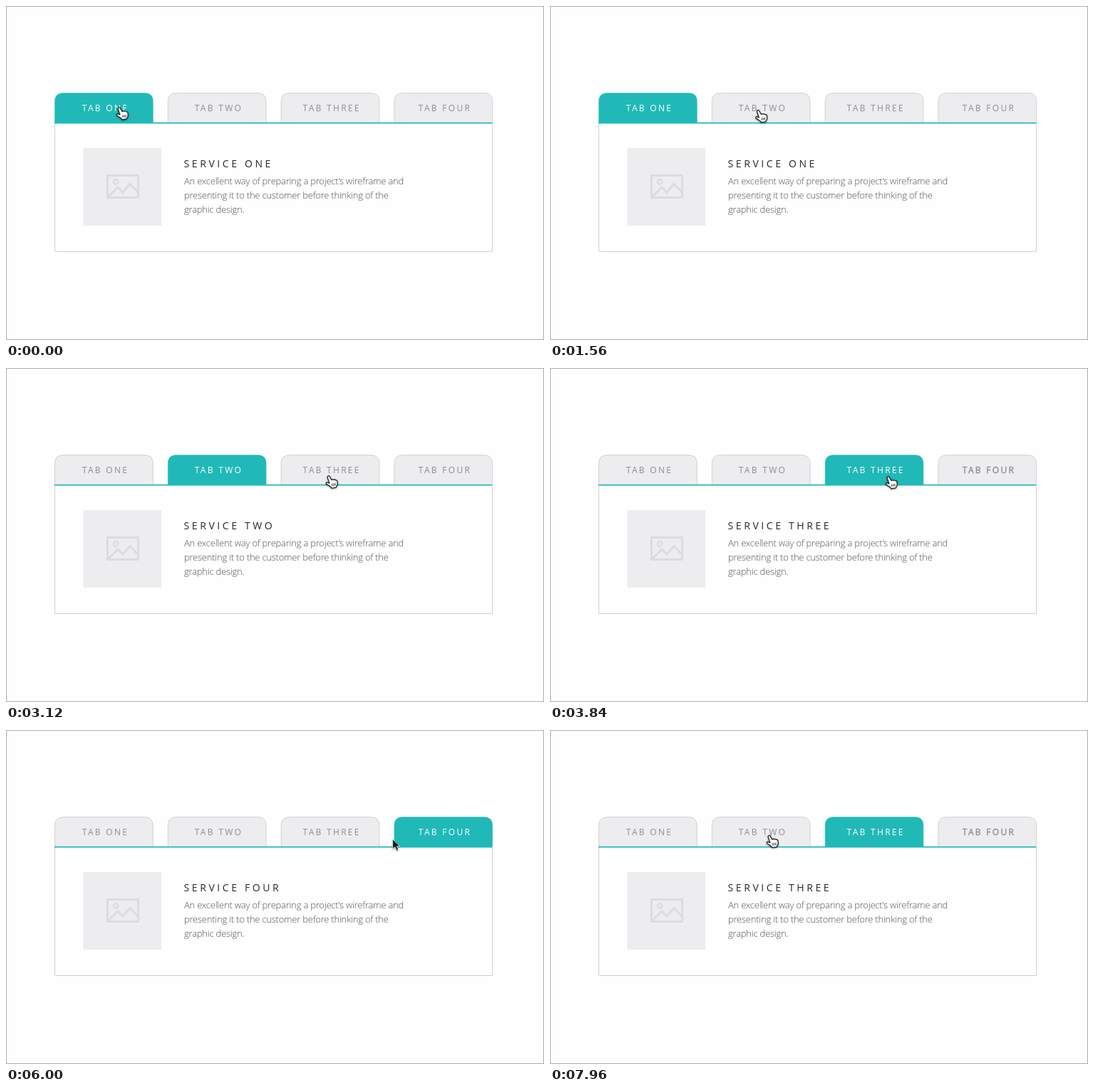
Recreate the animation shown at these times as an HTML page. Size 755x470 px, loop 8 s.

```html
<!DOCTYPE html>
<html lang="en">
<head>
<meta charset="utf-8">
<title>Tabs</title>
<style>
  html, body { margin: 0; width: 100%; height: 100%; overflow: hidden; background: #fefefe; }
  svg { display: block; width: 755px; height: 470px; font-family: "Open Sans", sans-serif; }
  .tab path { fill: #ededef; stroke: #d2d2d6; }
  .tab text { font-size: 12px; letter-spacing: 2.3px; fill: #8d8d8f; text-anchor: middle; }
  .tab.active path { fill: #20b9b7; stroke: #20b9b7; stroke-width: .5; }
  .tab.active text { fill: #fff; }
  .tab:nth-child(3).active + .tab text { stroke: #8d8d8f; stroke-width: .35px; }
  #title { font-size: 14px; letter-spacing: 3.6px; fill: #262628; }
  .copy { font-size: 13px; font-weight: 300; letter-spacing: -.23px; fill: #525254; }
  .icon { fill: none; stroke: #dcdce0; stroke-width: 3; }
  #pointer { filter: drop-shadow(0 1px 1px rgba(0, 0, 0, .4)); }
</style>
</head>
<body>
<svg viewBox="0 0 755 470">
  <rect x=".5" y=".5" width="754" height="469" fill="#fefefe" stroke="#acacac"/>
  <path d="M68.5 164V345.5H682.5V164" fill="none" stroke="#cfcfd1"/>
  <g id="tabs"></g>
  <path d="M68 164.6H682" stroke="#20b9b7" stroke-width="1.8"/>

  <rect x="108.5" y="200" width="109.5" height="109" fill="#ededef"/>
  <g class="icon">
    <rect x="142.5" y="238.5" width="43" height="31"/>
    <circle cx="154" cy="247.5" r="3.2" stroke-width="2.4"/>
    <path d="M144 268L157 255L164 262L174 250.5L186 263"/>
  </g>

  <text id="title" x="249.5" y="227"></text>
  <g class="copy">
    <text x="250" y="251">An excellent way of preparing a project’s wireframe and</text>
    <text x="250" y="271">presenting it to the customer before thinking of the</text>
    <text x="250" y="290.5">graphic design.</text>
  </g>

  <g id="pointer" stroke-linejoin="round">
    <g id="hand">
      <path d="M-2 1.5Q-1.5-.8 .8 0L4 5.5Q5.5 4 7 5.3Q8.5 4.2 9.6 5.8Q11.4 5.2 12 7.5L12.2 12L10 16L4 17L2.6 15L-3.2 11.2Q-4.4 9-2.6 8.6L.9 10Z"
        fill="#fff" stroke="#222" stroke-width="1.3"/>
      <path d="M4.8 10.5V14M6.9 10.3V13.8M9 10V13.5" stroke="#333"/>
    </g>
    <path id="arrow" d="M0 0V14L3.3 11L5.6 16.2L8.2 15.1L6 10.1H10.3Z"
      fill="#1c1c1c" stroke="#fff" stroke-width=".8"/>
  </g>
</svg>
<script>
const DURATION = 8000;
const NAMES = ["ONE", "TWO", "THREE", "FOUR"];
const TAB_WIDTH = 137.8;
const tabLeft = i => 68.5 + 158.8 * i;

const HOME = { x: 159, y: 143 };
const MOVES = [
  { start: 0, end: 1700, x: 295, y: 146 },
  { start: 1760, end: 3280, x: 458, y: 151 },
  { start: 3600, end: 4800, x: 620, y: 147 },
  { start: 5720, end: 6280, x: 466, y: 152 },
  { start: 7140, end: 8000, x: 307, y: 148 }
];
const BOW = 4; // downward sag of each move
const CLICKS = [0, 1780, 3360, 4880, 6600];

const $ = id => document.getElementById(id);

$("tabs").innerHTML = NAMES.map((name, i) => `
  <g class="tab" transform="translate(${tabLeft(i)})">
    <path d="M0 164V134.5q0-12 12-12h${TAB_WIDTH - 24}q12 0 12 12V164"/>
    <text x="${TAB_WIDTH / 2 + 2.2}" y="148">TAB ${name}</text>
  </g>`).join("");
const tabs = [...$("tabs").children];

function pointerAt(time) {
  let { x, y } = HOME;
  for (const move of MOVES) {
    const u = Math.min(1, Math.max(0, (time - move.start) / (move.end - move.start)));
    const eased = u * u * (3 - 2 * u);
    x += (move.x - x) * eased;
    y += (move.y - y) * eased + BOW * Math.sin(Math.PI * u);
  }
  return { x, y };
}

const tabUnder = x => NAMES.findIndex((_, i) => x >= tabLeft(i) && x <= tabLeft(i) + TAB_WIDTH);

function draw(time) {
  const lastClick = CLICKS.filter(t => t <= time).pop();
  const active = tabUnder(pointerAt(lastClick).x);
  tabs.forEach((tab, i) => tab.classList.toggle("active", i === active));
  $("title").textContent = "SERVICE " + NAMES[active];

  const { x, y } = pointerAt(time);
  const overTab = tabUnder(x) >= 0;
  $("pointer").setAttribute("transform", `translate(${x} ${y})`);
  $("hand").style.display = overTab ? "" : "none";
  $("arrow").style.display = overTab ? "none" : "";
}

const start = performance.now();
function tick() {
  draw((performance.now() - start) % DURATION);
  requestAnimationFrame(tick);
}
draw(0);
requestAnimationFrame(tick);
</script>
</body>
</html>
```
